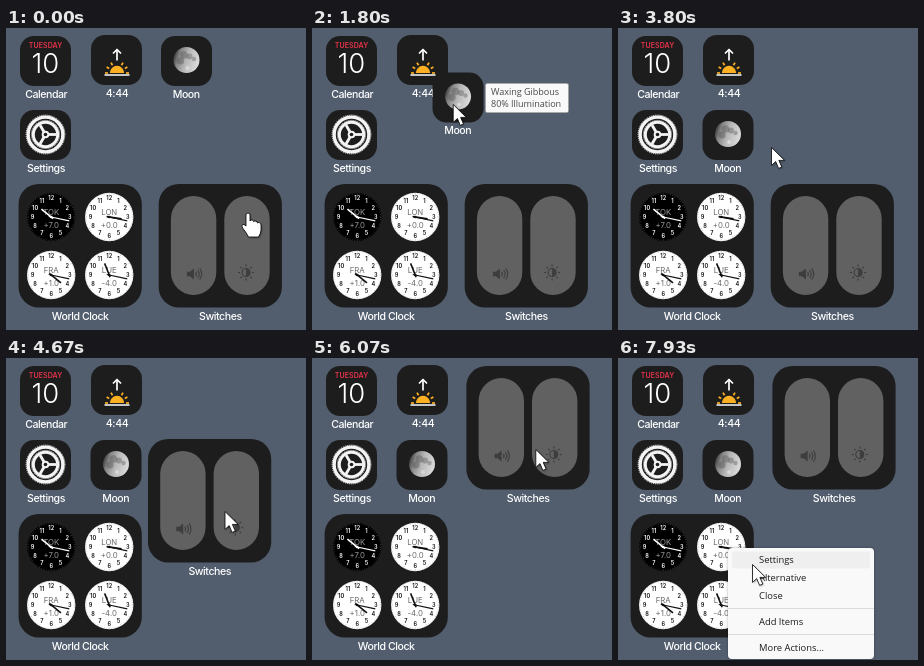
Recreate the animation shown at these times as an HTML page with a canvas. Size 300 by 302 pixels, loop 8 s.

```html
<!DOCTYPE html>
<html lang="en">
<head>
<meta charset="utf-8">
<title>Desktop widgets</title>
<style>
html, body { margin: 0; width: 100%; height: 100%; overflow: hidden; background: #525e6e; }
canvas { display: block; width: 300px; height: 302px; }
</style>
</head>
<body>
<canvas id="stage"></canvas>
<script>
const W = 300, H = 302, LOOP = 8000, STEP = 1000 / 15, TAU = Math.PI * 2;
const UI = 'Inter, "Liberation Sans", sans-serif';
const MENU = '"Open Sans", "Noto Sans", sans-serif';
const DARK = '#1d1d1d';

const canvas = document.getElementById('stage');
const c = canvas.getContext('2d');
const dpr = window.devicePixelRatio || 1;
canvas.width = W * dpr;
canvas.height = H * dpr;

// Keyframes: [step, x, y], 15 steps per second
const pointerKeys = [
  [0, 242, 185], [13, 177, 47], [15, 175.5, 29.5], [20, 175.5, 29.5], [32, 106, 104],
  [34, 105, 104], [38, 105, 104], [39, 107, 104], [41, 108, 104], [43, 108, 104],
  [44, 109, 104], [46, 109, 104], [51, 133, 108], [56, 133, 108], [57, 153, 119],
  [61, 229, 243], [63, 229, 243], [70, 218.5, 153], [76, 225, 108], [84, 224.5, 91],
  [88, 224.5, 91], [89, 224, 91], [90, 224, 91], [91, 223.3, 91], [99, 223.3, 91],
  [112, 109, 190], [114, 109, 190], [119, 134, 206]
];
const moonKeys = [[20, 155, 8], [32, 86, 81], [34, 84.5, 82]];
const switchKeys = [[63, 152.7, 156], [70, 142, 81], [76, 152.5, 32], [84, 154.4, 8]];

// Hermite interpolation with flat tangents at holds and turning points
function slope(keys, i, k) {
  const p = keys[i - 1], q = keys[i], r = keys[i + 1];
  if (!p || !r || (q[k] - p[k]) * (r[k] - q[k]) <= 0) return 0;
  return (r[k] - p[k]) / (r[0] - p[0]);
}

function at(keys, s) {
  const last = keys.length - 1;
  if (s <= keys[0][0]) return keys[0].slice(1);
  if (s >= keys[last][0]) return keys[last].slice(1);
  const i = keys.findIndex(k => k[0] > s) - 1;
  const a = keys[i], b = keys[i + 1], d = b[0] - a[0], u = (s - a[0]) / d;
  const u2 = u * u, u3 = u2 * u;
  return [1, 2].map(k =>
    a[k] * (2 * u3 - 3 * u2 + 1) + b[k] * (3 * u2 - 2 * u3) +
    d * (slope(keys, i, k) * (u3 - 2 * u2 + u) + slope(keys, i + 1, k) * (u3 - u2)));
}

function box(x, y, w, h, r, fill) {
  c.fillStyle = fill;
  c.beginPath();
  c.roundRect(x, y, w, h, r);
  c.fill();
}

function disc(x, y, r, fill) {
  c.fillStyle = fill;
  c.beginPath();
  c.arc(x, y, r, 0, TAU);
  c.fill();
}

function ring(x, y, r, width, color, dash = []) {
  c.strokeStyle = color;
  c.lineWidth = width;
  c.setLineDash(dash);
  c.beginPath();
  c.arc(x, y, r, 0, TAU);
  c.stroke();
  c.setLineDash([]);
}

function line(points, width, color) {
  c.strokeStyle = color;
  c.lineWidth = width;
  c.beginPath();
  points.forEach(([x, y]) => c.lineTo(x, y));
  c.stroke();
}

function text(str, x, y, font, color, align = 'center', spacing = 0) {
  c.font = font;
  c.fillStyle = color;
  c.textAlign = align;
  c.letterSpacing = spacing + 'px';
  c.fillText(str, x, y);
}

const label = (str, x, y) => text(str, x, y + 3.7, `500 10.6px ${UI}`, '#fff', 'center', -0.45);
const tile = (x, y) => box(x, y, 51, 50, 14, DARK);
const panel = (x, y) => box(x, y, 123.2, 123.4, 20, DARK);

function calendar(x, y) {
  tile(x, y);
  text('TUESDAY', x + 25.5, y + 11.9, `600 7px ${UI}`, '#e8334a', 'center', 0.1);
  text('10', x + 25.3, y + 37, `300 27.5px ${UI}`, '#fff', 'center', -0.2);
  label('Calendar', x + 26.2, y + 58);
}

function sunrise(x, y) {
  tile(x, y);
  const cx = x + 26, base = y + 38, sun = '#fdb022';
  line([[cx, y + 25.5], [cx, y + 15]], 1.7, '#fff');
  line([[cx - 4, y + 18.5], [cx, y + 14.5], [cx + 4, y + 18.5]], 1.7, '#fff');
  c.fillStyle = sun;
  c.beginPath();
  c.arc(cx, base, 7.2, Math.PI, TAU);
  c.fill();
  for (const i of [0, 1, 2, 4, 5, 6]) {
    const a = Math.PI * (1 + i / 6), dx = Math.cos(a), dy = Math.sin(a);
    line([[cx + dx * 9, base + dy * 9], [cx + dx * 12, base + dy * 12]], 1.7, sun);
  }
  line([[cx - 12.5, base + 2], [cx + 12.5, base + 2]], 1.5, '#fff');
  label('4:44', x + 26, y + 58);
}

function settings(x, y) {
  tile(x, y);
  const cx = x + 25.5, cy = y + 24.5, white = '#f4f4f4';
  ring(cx, cy, 17.4, 3.4, white);
  ring(cx, cy, 19.4, 1, white, [1, 1]);
  ring(cx, cy, 12.2, 3, white);
  ring(cx, cy, 14.1, 1, white, [1, 1]);
  for (let i = 0; i < 3; i++) {
    const a = i * TAU / 3;
    line([[cx, cy], [cx + 11 * Math.cos(a), cy + 11 * Math.sin(a)]], 2.8, white);
  }
  disc(cx, cy, 3.8, white);
  disc(cx, cy, 1.8, DARK);
  label('Settings', x + 26, y + 58);
}

function moon(x, y) {
  tile(x, y);
  const cx = x + 25.5, cy = y + 24;
  const g = c.createLinearGradient(cx - 13, cy - 4, cx + 13, cy + 4);
  g.addColorStop(0, '#383838');
  g.addColorStop(.2, '#858585');
  g.addColorStop(.5, '#b8b8b8');
  g.addColorStop(1, '#dedede');
  disc(cx, cy, 13, g);
  const sea = 'rgba(70,70,70,.34)';
  disc(cx - 2.5, cy - 5, 3.8, sea);
  disc(cx + 3, cy - 3.5, 3, sea);
  disc(cx + 7.5, cy - 1, 2.2, sea);
  disc(cx - 6, cy + 1, 3.6, sea);
  disc(cx + 1, cy + 8, 2, 'rgba(240,240,240,.5)');
  label('Moon', x + 25.2, y + 58);
}

function clock(x, y, city, offset, hour, night) {
  const ink = night ? '#fff' : '#111';
  const soft = night ? '#999' : '#6a6a6a';
  disc(x, y, 24.2, night ? '#000' : '#fff');
  for (let i = 0; i < 60; i++) {
    const a = i * TAU / 60, r = i % 5 ? 23 : 22.3;
    line([[x + Math.sin(a) * r, y - Math.cos(a) * r],
          [x + Math.sin(a) * 23.8, y - Math.cos(a) * 23.8]], .4, soft);
  }
  for (let n = 1; n <= 12; n++) {
    const a = n * TAU / 12;
    text(n, x + Math.sin(a) * 18.6, y - Math.cos(a) * 18.6 + 2, `600 5.6px ${UI}`, ink);
  }
  text(city, x, y - 2, `400 7.8px ${UI}`, soft);
  text(offset, x, y + 11, `400 7.8px ${UI}`, soft);
  const minute = 17;
  const hand = (turn, len, width) => {
    const a = turn * TAU, s = Math.sin(a), k = -Math.cos(a);
    line([[x - s * 2.5, y - k * 2.5], [x + s * len, y + k * len]], width, ink);
  };
  hand((hour + minute / 60) / 12, 12.5, 1.6);
  hand(minute / 60, 18.5, 1.2);
  disc(x, y, 1.3, ink);
}

function worldClock() {
  panel(12.6, 156);
  clock(45.2, 189, 'TOK', '+7.0', 10, true);
  clock(103.2, 189, 'LON', '+0.0', 3);
  clock(45.2, 247, 'FRA', '+1.0', 4);
  clock(103.2, 247, 'LUE', '-4.0', 11);
  label('World Clock', 74.2, 288);
}

function switches(x, y) {
  const ink = '#3d3d3d';
  panel(x, y);
  box(x + 12.2, y + 12, 45.4, 99, 22.7, '#616161');
  box(x + 65.6, y + 12, 45.4, 99, 22.7, '#616161');
  const sx = x + 28.2, sy = y + 90;
  c.fillStyle = ink;
  c.beginPath();
  [[0, -2.3], [3, -2.3], [7, -5.5], [7, 5.5], [3, 2.3], [0, 2.3]]
    .forEach(([dx, dy]) => c.lineTo(sx + dx, sy + dy));
  c.fill();
  c.strokeStyle = ink;
  c.lineWidth = 1.1;
  for (let i = 0; i < 3; i++) {
    c.beginPath();
    c.arc(sx + 6, sy, 3.4 + i * 2.7, -.7, .7);
    c.stroke();
  }
  const bx = x + 87.4, by = y + 88.5;
  ring(bx, by, 4, 1.1, ink);
  c.beginPath();
  c.arc(bx, by, 4, -Math.PI / 2, Math.PI / 2);
  c.fill();
  for (let i = 0; i < 8; i++) {
    const a = i * TAU / 8, dx = Math.cos(a), dy = Math.sin(a);
    line([[bx + dx * 6, by + dy * 6], [bx + dx * 8, by + dy * 8]], 1.2, ink);
  }
  label('Switches', x + 61.7, y + 132);
}

function tooltip() {
  box(173, 55, 84, 30, 2, '#8d8d8d');
  box(173.8, 55.8, 82.4, 28.4, 1.5, '#f9f9f9');
  text('Waxing Gibbous', 179, 66.5, `400 9.1px ${MENU}`, '#4b4b4b', 'left', -0.05);
  text('80% Illumination', 179, 79, `400 9.1px ${MENU}`, '#4b4b4b', 'left', -0.05);
}

function menu(px, py) {
  c.save();
  c.shadowColor = 'rgba(0,0,0,.3)';
  c.shadowBlur = 3 * dpr;
  box(110, 190, 146, 111, 4, '#f9f9f9');
  c.restore();
  if (px > 114 && py > 194) box(114, 193.5, 138, 17, 3, '#efefef');
  const items = [['Settings', 201], ['Alternative', 219], ['Close', 237],
                 ['Add Items', 263], ['More Actions...', 289]];
  for (const [str, y] of items) text(str, 141, y + 3.5, `400 9.4px ${MENU}`, '#1b1b1b', 'left');
  for (const y of [250, 276]) box(110, y, 146, 1, 0, '#dcdcdc');
}

function shape(path) {
  const p = new Path2D(path);
  c.save();
  c.shadowColor = 'rgba(0,0,0,.35)';
  c.shadowBlur = 2 * dpr;
  c.shadowOffsetX = c.shadowOffsetY = dpr;
  c.fillStyle = '#fff';
  c.fill(p);
  c.restore();
  c.strokeStyle = '#000';
  c.lineWidth = .8;
  c.stroke(p);
}

function pointer(x, y, hand) {
  c.save();
  c.translate(x, y);
  if (hand) {
    shape('M-2 13V2Q-2 0 0 0Q2 0 2 2V8Q2.5 6.5 4 7Q5.5 7 5.8 8.8Q6.5 7.6 8 8.2' +
      'Q9.4 8.6 9.5 10Q10.5 9 11.7 9.8Q13 10.4 13 12V17Q13 20 10.5 24H.5' +
      'Q-1 20.5-5 15.5Q-7 12.5-5.5 11.5Q-4 11-2 13Z');
  } else {
    shape('M.5.5V18.4L4.7 14.6L7.6 21.4L10.8 20L7.9 13.4H13.6Z');
  }
  c.restore();
}

function draw(ms) {
  const step = Math.floor((ms % LOOP + 5) / STEP) % 120;
  const [px, py] = at(pointerKeys, step);
  c.setTransform(dpr, 0, 0, dpr, 0, 0);
  c.lineJoin = 'round';
  c.fillStyle = '#525e6e';
  c.fillRect(0, 0, W, H);
  calendar(14, 8);
  sunrise(85, 7);
  settings(14, 82);
  worldClock();
  switches(...at(switchKeys, step));
  moon(...at(moonKeys, step));
  if (step >= 21 && step < 49) tooltip();
  if (step >= 115) menu(px, py);
  pointer(px, py, step < 13 && py > 160);
}

const start = performance.now();
function tick() {
  draw(performance.now() - start);
  requestAnimationFrame(tick);
}
tick();
</script>
</body>
</html>
```
